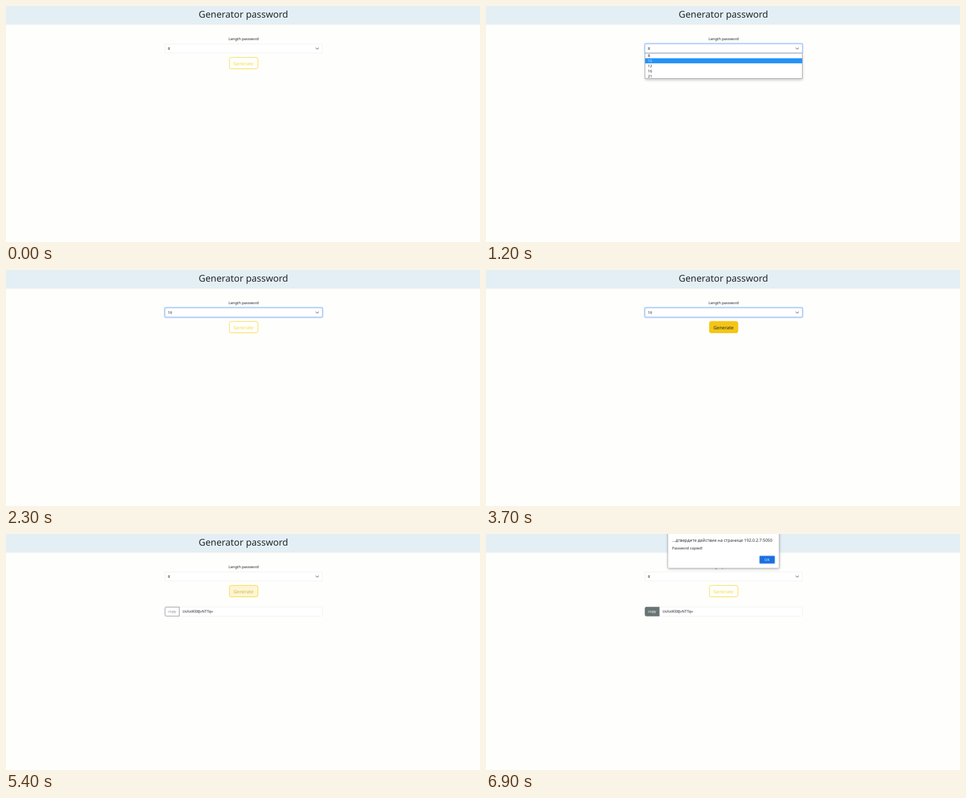
These frames come from a looping animation (732x366 px, 8000 ms). An HTML page:

```html
<!DOCTYPE html>
<html lang="en">
<head>
<meta charset="utf-8">
<title>Generator password</title>
<style>
  html, body { margin: 0; width: 100%; height: 100%; overflow: hidden; background: #fefefd; }
  svg { display: block; width: 100vw; height: 100vh; }
  text { font: 5.75px "Noto Sans", "Open Sans", sans-serif; fill: #212529; text-rendering: geometricPrecision; }
  .mid { text-anchor: middle; }
  .title { font-size: 14.4px; }
  .button { font-size: 7.2px; }
  .heading { font-size: 6.45px; }
  .field { fill: #fff; stroke: #eeeeef; stroke-width: .7; }
</style>
</head>
<body>
<svg viewBox="0 0 732 366" xmlns="http://www.w3.org/2000/svg">
  <defs>
    <linearGradient id="fade" x2="0" y2="1">
      <stop stop-color="#dfe6ea"/>
      <stop offset="1" stop-color="#fefefd"/>
    </linearGradient>
    <filter id="soft" x="-20%" y="-40%" width="140%" height="180%">
      <feGaussianBlur stdDeviation="2"/>
    </filter>
  </defs>

  <rect width="732" height="366" fill="#fefefd"/>
  <rect y="27" width="732" height="3" fill="url(#fade)"/>
  <rect width="732" height="27.3" fill="#e4eff5"/>
  <text class="mid title" x="366.6" y="18">Generator password</text>
  <text class="mid" x="367" y="53.2">Length password</text>

  <rect id="ring" x="244.6" y="57.9" width="244.8" height="15.9" rx="2.6" fill="none" stroke="#c3dbfd" stroke-width="1.7"/>
  <rect id="select" class="field" x="245.5" y="58.8" width="243" height="14.1" rx="2"/>
  <text id="value" x="250" y="68.1"></text>
  <path d="M478.5 65l2.1 2 2.1-2" fill="none" stroke="#343a40" stroke-width=".9" stroke-linecap="round" stroke-linejoin="round"/>

  <rect id="buttonBox" x="345" y="79.8" width="44" height="17.6" rx="2.7" stroke-width=".9"/>
  <text id="buttonText" class="mid button" x="366.8" y="91.5">Generate</text>

  <g id="result">
    <rect class="field" x="267.5" y="113.2" width="221.2" height="14.2" rx="2"/>
    <path id="copyBox" d="M267.6 113.3h-20a2 2 0 0 0-2 2v10a2 2 0 0 0 2 2h20z" stroke="#6c757a" stroke-width=".7"/>
    <text id="copyText" class="mid" x="256.5" y="122.3">copy</text>
    <text x="272.4" y="122.3">UsXolKlI8JvNTTqv</text>
  </g>

  <g id="list">
    <rect x="246" y="75" width="243" height="40" fill="#000" opacity=".2" filter="url(#soft)"/>
    <rect x="245.4" y="73.2" width="243.2" height="39.2" fill="#fff" stroke="#8f9194" stroke-width=".7"/>
    <rect id="mark" x="245.7" width="242.6" height="7.8" fill="#2492f8"/>
    <g id="options"></g>
  </g>

  <g id="dialog">
    <rect x="281" y="-8" width="172" height="62" rx="2" fill="#000" opacity=".3" filter="url(#soft)"/>
    <rect x="280.8" y="-5" width="172" height="58" rx="1.5" fill="#fff" stroke="#a9adb0" stroke-width=".7"/>
    <text class="heading" x="287.6" y="12.1">…дтвердите действие на странице 192.0.2.7:5050</text>
    <text x="287.3" y="24.4">Password copied!</text>
    <rect x="421.8" y="33.3" width="24.8" height="13.2" rx="1.8" fill="#a5c9f6"/>
    <rect x="422.7" y="34.2" width="23" height="11.4" rx="1" fill="#1a6fe0"/>
    <text class="mid" x="434.1" y="42" style="fill:#dcebff">OK</text>
  </g>
</svg>
<script>
const LOOP = 8000, ROW_TOP = 73.3, ROW_STEP = 7.8;
const lengths = [8, 10, 12, 16, 21];
const el = id => document.getElementById(id);

// Each track is a list of [start time, value] holds.
const tracks = {
  focus: [[0, 0], [500, .5], [600, 1], [4300, 0]],
  open: [[0, 0], [500, 1], [2300, 0]],
  row: [[0, 0], [1200, 1], [1400, 2], [1500, 3]],
  value: [[0, 8], [2300, 16], [4500, 8]],
  hover: [[0, 0], [3100, .5], [3200, 1], [5400, .18], [5500, 0]],
  result: [[0, 0], [4500, 1]],
  copy: [[0, 0], [5600, .6], [5700, 1]],
  dialog: [[0, 0], [6700, .4], [6800, .85], [6900, 1]]
};
const at = (name, t) => tracks[name].findLast(([start]) => start <= t)[1];

const mix = (a, b, k) => `rgb(${a.map((c, i) => Math.round(c + (b[i] - c) * k))})`;
const show = (id, opacity) => el(id).setAttribute("opacity", opacity);
const paint = (id, color) => el(id).style.fill = color;

const white = [255, 255, 254], grey = [104, 116, 116], faint = [132, 138, 142];
const yellow = [248, 216, 60], amber = [245, 197, 20], ink = [33, 37, 41];

const options = lengths.map((n, i) => {
  const label = document.createElementNS("http://www.w3.org/2000/svg", "text");
  label.setAttribute("x", 250);
  label.setAttribute("y", ROW_TOP + ROW_STEP * i + 6);
  label.textContent = n;
  return el("options").appendChild(label);
});

function draw(t) {
  const focus = at("focus", t), hover = at("hover", t), copy = at("copy", t), row = at("row", t);

  show("ring", focus);
  el("select").style.stroke = mix([236, 236, 238], [134, 176, 240], focus);
  el("value").textContent = at("value", t);

  show("list", at("open", t));
  el("mark").setAttribute("y", ROW_TOP + ROW_STEP * row);
  options.forEach((label, i) => label.style.fill = i === row ? "#d5eaff" : "#212529");

  paint("buttonBox", mix(white, amber, hover));
  el("buttonBox").style.stroke = mix(yellow, amber, hover);
  paint("buttonText", mix(yellow, ink, hover));

  show("result", at("result", t));
  paint("copyBox", mix(white, grey, copy));
  paint("copyText", mix(faint, white, copy));

  show("dialog", at("dialog", t));
}

const origin = performance.now();
function tick() {
  draw((performance.now() - origin) % LOOP);
  requestAnimationFrame(tick);
}
tick();
</script>
</body>
</html>
```
